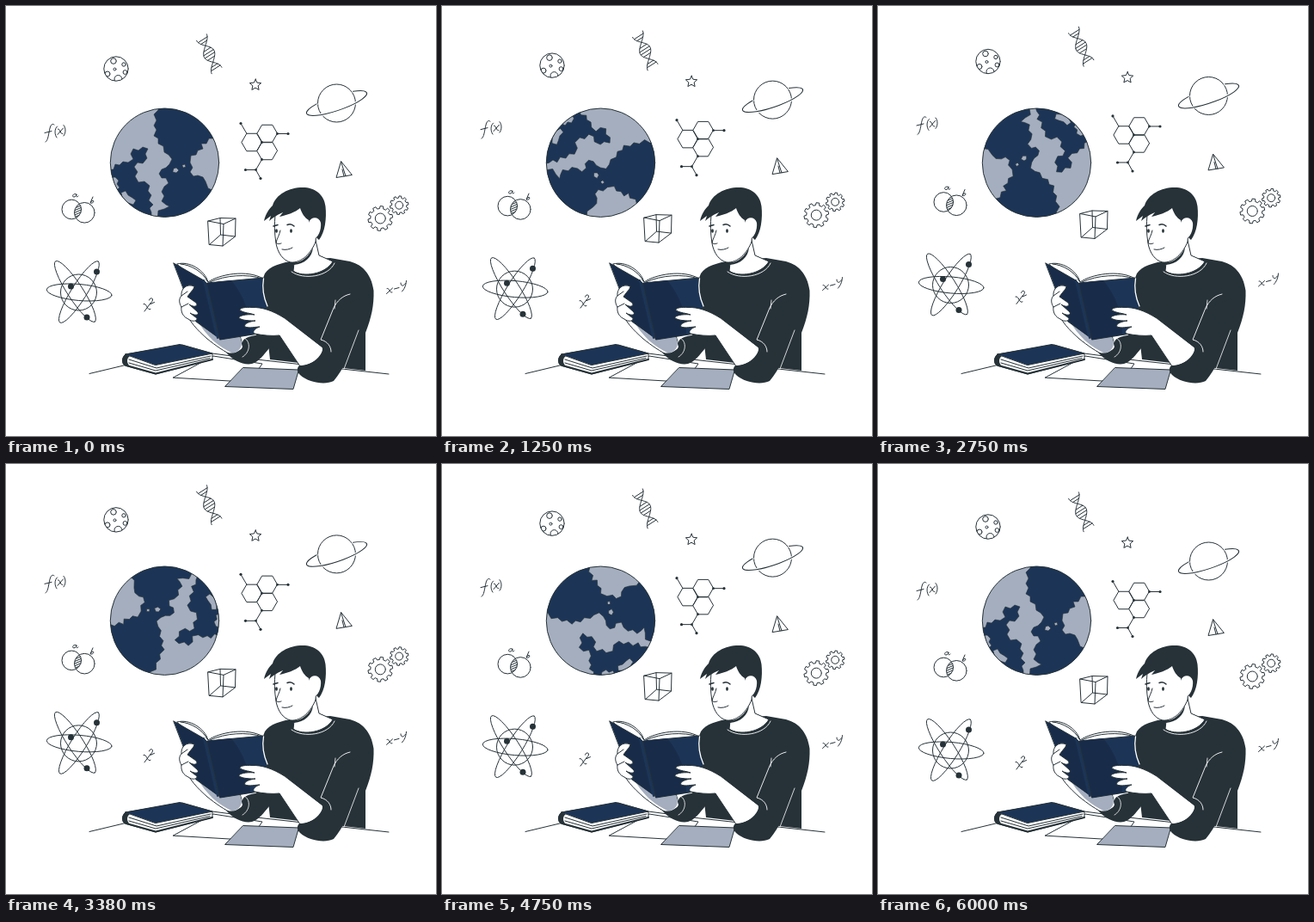
These frames come from a looping animation (500x500 px, 6.04 s). An HTML page with a canvas:

```html
<!DOCTYPE html>
<html lang="en">
<head>
<meta charset="utf-8">
<title>Science student</title>
<style>
html, body { margin: 0; width: 100%; height: 100%; overflow: hidden; background: #fff; }
canvas { display: block; width: 500px; height: 500px; }
</style>
</head>
<body>
<canvas id="stage"></canvas>
<script>
const INK = '#263238', NAVY = '#1c3557', SHADE = '#182c49', GRAY = '#a5aebe', WHITE = '#fff';
const LOOP = 6040, SPIN = 6000, STEP = 1000 / 24, RISE = 9.3;
const TAU = Math.PI * 2;

const canvas = document.getElementById('stage');
const scale = window.devicePixelRatio || 1;
canvas.width = canvas.height = 500 * scale;
const g = canvas.getContext('2d');
g.lineCap = g.lineJoin = 'round';

function fill(d, color, edge, w = 1) {
  const p = new Path2D(d);
  g.fillStyle = color;
  g.fill(p);
  if (edge) {
    g.strokeStyle = edge;
    g.lineWidth = w;
    g.stroke(p);
  }
}

function line(d, color = INK, w = 1) {
  g.strokeStyle = color;
  g.lineWidth = w;
  g.stroke(new Path2D(d));
}

function ring(x, y, rx, ry = rx, tilt = 0, w = 1) {
  g.beginPath();
  g.ellipse(x, y, rx, ry, tilt * Math.PI / 180, 0, TAU);
  g.strokeStyle = INK;
  g.lineWidth = w;
  g.stroke();
}

function dot(x, y, r, color = INK) {
  g.beginPath();
  g.arc(x, y, r, 0, TAU);
  g.fillStyle = color;
  g.fill();
}

function clipCircle(x, y, r) {
  g.beginPath();
  g.arc(x, y, r, 0, TAU);
  g.clip();
}

function polygon(points) {
  g.beginPath();
  points.forEach(([x, y]) => g.lineTo(x, y));
  g.closePath();
  g.strokeStyle = INK;
  g.lineWidth = 1;
  g.stroke();
}

const polar = (x, y, r, a) => [x + r * Math.cos(a), y + r * Math.sin(a)];

// Land masses on the globe at angle zero
const MAIN_LAND = 'M179 114L177 121L172 126L175 133L172 139L175 144L172 151L177 154L177 160L183 163L184 170'
  + 'L189 173L193 178L190 184L186 188L181 190L178 195L181 200L186 200L189 206L184 210L181 216L184 221'
  + 'L181 227L186 231L190 233L184 236L177 238L176 250L248 250L240 214'
  + 'L235 212L232 204L229 199L223 197L218 198L214 193L217 188L214 182L215 174L221 173L223 168L229 166L227 160L233 160L236 154L250 154L240 110Z';
const WEST_LAND = 'M114 191L125 190L127 184L132 185L136 181L142 182L148 178L145 172L148 166L154 168L159 164L165 166'
  + 'L162 172L164 177L159 183L153 182L149 187L153 193L150 198L154 205L161 204L167 209L165 215L169 220L166 226'
  + 'L171 231L167 235L169 240L169 252L110 252Z';
const LAKES = 'M114 200L127 199L131 203L129 207L132 211L128 215L118 214Z'
  + 'M134 217L139 215L142 220L147 223L151 226L148 231L142 229L136 224Z'
  + 'M195 189L198 188L201 191L198 194L194 193Z M205 185L208 184L209 187L206 188Z';

function globe(turn) {
  const x = 184.5, y = 182.2, r = 63.2;
  dot(x, y, r, GRAY);
  g.save();
  clipCircle(x, y, r);
  g.translate(x, y);
  g.rotate(turn * TAU);
  g.translate(-x, -y);
  fill(MAIN_LAND, NAVY, INK, 0.6);
  fill(WEST_LAND, NAVY, INK, 0.6);
  fill(LAKES, GRAY, INK, 0.6);
  g.restore();
  ring(x, y, r);
}

function moon() {
  g.save();
  clipCircle(128, 73, 14.2);
  ring(125, 64, 3.3);
  ring(137, 68, 2.2);
  ring(126.5, 73.5, 1.5);
  ring(118, 79, 3);
  ring(130.5, 85, 4.5);
  ring(138.5, 77, 2.4);
  g.restore();
  ring(128, 73, 14.2);
}

function dna() {
  const at = (u, side) => {
    const off = side * 6.8 * Math.cos(u * TAU);
    return [227.5 + 17.5 * u + off * 0.86, 36.5 + 38.500 * u - off * 0.55];
  };
  g.beginPath();
  for (const side of [-1, 1])
    for (let i = 0; i <= 40; i++) {
      const p = at(i / 40, side);
      i ? g.lineTo(...p) : g.moveTo(...p);
    }
  for (const u of [0.07, 0.15, 0.37, 0.46, 0.54, 0.63, 0.85, 0.93]) {
    g.moveTo(...at(u, -1));
    g.lineTo(...at(u, 1));
  }
  g.strokeStyle = INK;
  g.lineWidth = 1;
  g.stroke();
}

function star() {
  const pts = [];
  for (let i = 0; i < 10; i++)
    pts.push(polar(290, 91.8, i % 2 ? 3.3 : 7, i * TAU / 10 - TAU / 4));
  polygon(pts);
}

function saturn() {
  const x = 384.5, y = 113;
  ring(x, y, 22);
  g.save();
  g.translate(x, y);
  g.rotate(-0.33);
  g.beginPath();
  g.ellipse(0, 0, 37, 8.5, 0, -0.92, Math.PI + 0.92);
  g.strokeStyle = WHITE;
  g.lineWidth = 3;
  g.stroke();
  g.strokeStyle = INK;
  g.lineWidth = 1;
  g.stroke();
  g.restore();
}

function molecule() {
  for (const [x, y] of [[303.5, 148.5], [285.7, 158.5], [303.5, 168.5]]) {
    const pts = [];
    for (let i = 0; i < 6; i++) pts.push(polar(x, y, 11.8, i * TAU / 6));
    polygon(pts);
  }
  line('M273 136.5L280 148.500M315.500 148.500H328M297.500 178.500L290.500 190.500H278.500M290.500 190.500L296 200.500');
  for (const [x, y] of [[273, 136.5], [328, 148.5], [278.5, 190.5], [296, 200.5]]) dot(x, y, 1.6);
  for (const [x, y] of [[315.5, 148.5], [297.5, 158.5], [297.5, 178.5], [290.5, 190.5]]) dot(x, y, 1.4);
}

function gear(x, y, r, teeth, hole) {
  const pts = [], pitch = TAU / teeth;
  for (let i = 0; i < teeth; i++)
    for (const [k, f] of [[-0.3, 0.8], [-0.2, 1], [0.2, 1], [0.3, 0.8]])
      pts.push(polar(x, y, r * f, (i + k) * pitch - 0.2));
  polygon(pts);
  ring(x, y, hole);
}

function atom() {
  const x = 84.5, y = 333;
  ring(x, y, 21);
  ring(x + 0.7, y, 38, 9.5, 5);
  ring(x - 4, y - 1, 42, 9, 57);
  ring(x + 0.5, y - 0.5, 42, 9, -58);
  dot(105.5, 309, 3.5);
  dot(75.5, 326, 3.5);
  dot(94, 362, 3.5);
}

function venn() {
  ring(76.3, 236.5, 11.3);
  ring(91.3, 240.3, 11.8);
  g.save();
  clipCircle(76.3, 236.5, 11.3);
  clipCircle(91.3, 240.3, 11.8);
  for (let y = 226; y < 260; y += 2.6) line(`M76 ${y + 3}L92 ${y - 4}`);
  g.restore();
  line('M82 219C78 217 76 222 79 222C81 222 82 220 82 219C81 221 82 223 84 221');
  line('M101 222L98 229C101 230 103 227 101 226L98.5 228');
}

function formulas() {
  line('M56 138C52 135 51 142 50 147C49 153 48 157 46 158M45 147.5L53 145.5');
  line('M59.500 140C56 143 56.500 150 59 153M60.500 143C63 142 63 150 66 148.500M66.500 142L60 149.500M67 138.500C70 142 69.500 148 67 151');
  line('M160 346.500C164 345 164 355 168 352.500M168 345.500L161 355M166.500 342C167 339 171 339 170.500 342C170 344 168 345 168 346.500L172.500 344.500');
  line('M443 328.500C446 327 446 334.500 449 333M449.500 328L442.500 334.500M451.500 329L457 327.500M459 322C459 326 462 326.500 464.500 322.500M465.500 319.500C465 326 463 329 460.500 332');
}

function floaters() {
  moon();
  dna();
  star();
  saturn();
  molecule();
  line('M389.500 181L384 199.500L402 196.500ZM389.500 181L395 197.800M391 190L393 198');
  gear(435.3, 247, 14.4, 10, 6);
  gear(457.2, 231.7, 10.8, 10, 4.5);
  line('M235 250L249 246.500L267 247L266.500 268L252 279L236.500 277.500ZM235 250L253 253.500L267 247M253 253.500L252 279M249 246.500L249.500 266L236.500 277.500M249.500 266L266.500 268');
  atom();
  venn();
  formulas();
}

function desk() {
  line('M97 427.500L141 417M240 404L300 412L445 428');
  fill('M194.500 432L241 407L298 416L283 437Z', WHITE, INK);
  fill('M276 420.500L340.500 423L334 445.500L255 442.500Z', GRAY, INK);
  fill('M139 405L205 394L240 404L240 411L174 428L138 418C134 415 135 408 139 405Z', WHITE, INK);
  fill('M139 405C134 408 134 415 138 418L144 419C140 415 140 410 144 407Z', INK);
  fill('M139 405L202 393.500L240 404L174 417.500Z', NAVY, INK);
  line('M143 411L175 421L238 407M143 415L174 424L237 409.500');
  line('M140 418L174 427.500L240 411', INK, 2);
}

function body() {
  fill('M335 296C320 299 307 302 301 311C296 321 297 340 300 350L307 411L418 424L418 380'
    + 'C425 362 428 348 427.500 331C425 311 413 299 397 296.500L377 293Z', INK);
  fill('M336 290L334 308C345 316 372 312 380 297L364 290L359 268Z', WHITE, INK);
  line('M332 309C346 319 375 315 382 299', WHITE, 0.9);
  // far arm
  fill('M208 352C211 366 224 378 234 387C244 395 254 402 263 406L276 398L272 383L248 386Z', WHITE, INK);
  fill('M222 364L249 387L271 383C276 392 275 400 264 404C248 397 232 384 222 364Z', GRAY);
  fill('M307 372L309 388L306 398C300 405 295 413 286 416C276 418 264 412 256 403C266 405 273 402 275 396C273 388 278 385 290 383Z', INK);
  line('M277 386C285 390 284 403 275 408', WHITE, 0.8);
}

function openBook() {
  fill('M199 300C213 296 231 307 235 321C248 312 280 306 299 317L290 330L236 330Z', WHITE, INK);
  line('M203 300C215 301 229 309 234 320M237 321C255 313 280 311 298 317');
  fill('M195 299L230 319L236 325L249 387L221 367Z', NAVY, INK);
  fill('M234 322L299 316L299 332L304 348L300 380L249 388Z', NAVY, INK);
  fill('M234 322L262 319C277 338 284 356 284 382L249 388Z', SHADE);
  fill('M196 300L229 319L244 384L222 367Z', SHADE);
  line('M230 319L246 386', NAVY, 2);
  line('M299.500 317C297.500 329 300 340 304 349', WHITE, 1.3);
}

function hands() {
  fill('M219 326C210 322 203 329 204 337C200 341 202 347 204 350C203 357 207 362 212 364C217 368 223 366 222 363'
    + 'L214 357C219 360 225 360 223 356L213 347C219 351 224 349 221 345L211 338C215 332 219 329 219 326Z', WHITE, INK);
  line('M204 337L211 332M204 350L212 346');
  fill('M324 363C310 354 297 350 286 350.500C278 350 271 351 272 354C277 357 284 357 289 359C280 358 270 360 271 363'
    + 'C276 366 284 366 290 366C282 367 276 370 278 373C283 375 290 373 295 373C289 375 286 379 289 381C299 383 309 384 318 383'
    + 'L342 419C358 417 369 408 369 398Z', WHITE, INK);
  // near sleeve
  fill('M427 334C424 356 414 373 407 385C400 403 393 422 381 436C371 441 352 438 342 429C338 425 338 421 341 418'
    + 'C353 419 363 411 367 403C369 399 368 396 365 394L385 350Z', INK);
  line('M400 335C391 337 385 343 381 351L366 388C374 390 378 396 378 402', WHITE, 0.9);
  line('M382 352L383 342M410 377L393 422', WHITE, 0.8);
}

function head() {
  fill('M313 243C312 253 312 264 314 276C316 287 322 296 331 298C344 299 355 287 360 274L362 240L340 228Z', WHITE, INK);
  fill('M331 298C342 300 352 292 357 281C356 292 347 300 335 301Z', INK);
  fill('M300 250C302 241 306 236 310 232C314 219 329 211 345 211C359 211 370 219 371.500 233C373 247 371 263 364 272'
    + 'L354 263L352 249C347 246 344 241 342 235C336 240 327 243 318 245L322 240C315 243 310 246 306 250L308 244Z', INK);
  fill('M352 252C355 244 364 245 366 252C367 260 363 270 357 271C352 270 351 260 352 252Z', WHITE);
  line('M360 251C364 255 361 262 358 266', WHITE);
  line('M311 256L316 254.500M327 254.500C330 253 333 254 335 256', INK, 1.5);
  g.beginPath();
  for (const x of [314.5, 331.5]) g.ellipse(x, 261.5, 1.4, 2.2, 0, 0, TAU);
  g.fillStyle = INK;
  g.fill();
  line('M319 261C318 266 315 271 314 275C315 277 318 277 320 276M321 283C325 284 330 283 333 281');
}

function draw(t) {
  const frame = Math.min(Math.floor((t + 4.9) / STEP), 144);
  const u = frame * STEP / SPIN;
  g.setTransform(scale, 0, 0, scale, 0, 0);
  g.fillStyle = WHITE;
  g.fillRect(0, 0, 500, 500);
  globe(u);
  g.save();
  g.translate(0, -RISE * (1 - Math.abs(1 - 2 * u)));
  floaters();
  g.restore();
  desk();
  body();
  openBook();
  hands();
  head();
}

const start = performance.now();
function tick() {
  draw((performance.now() - start) % LOOP);
  requestAnimationFrame(tick);
}
tick();
</script>
</body>
</html>
```
